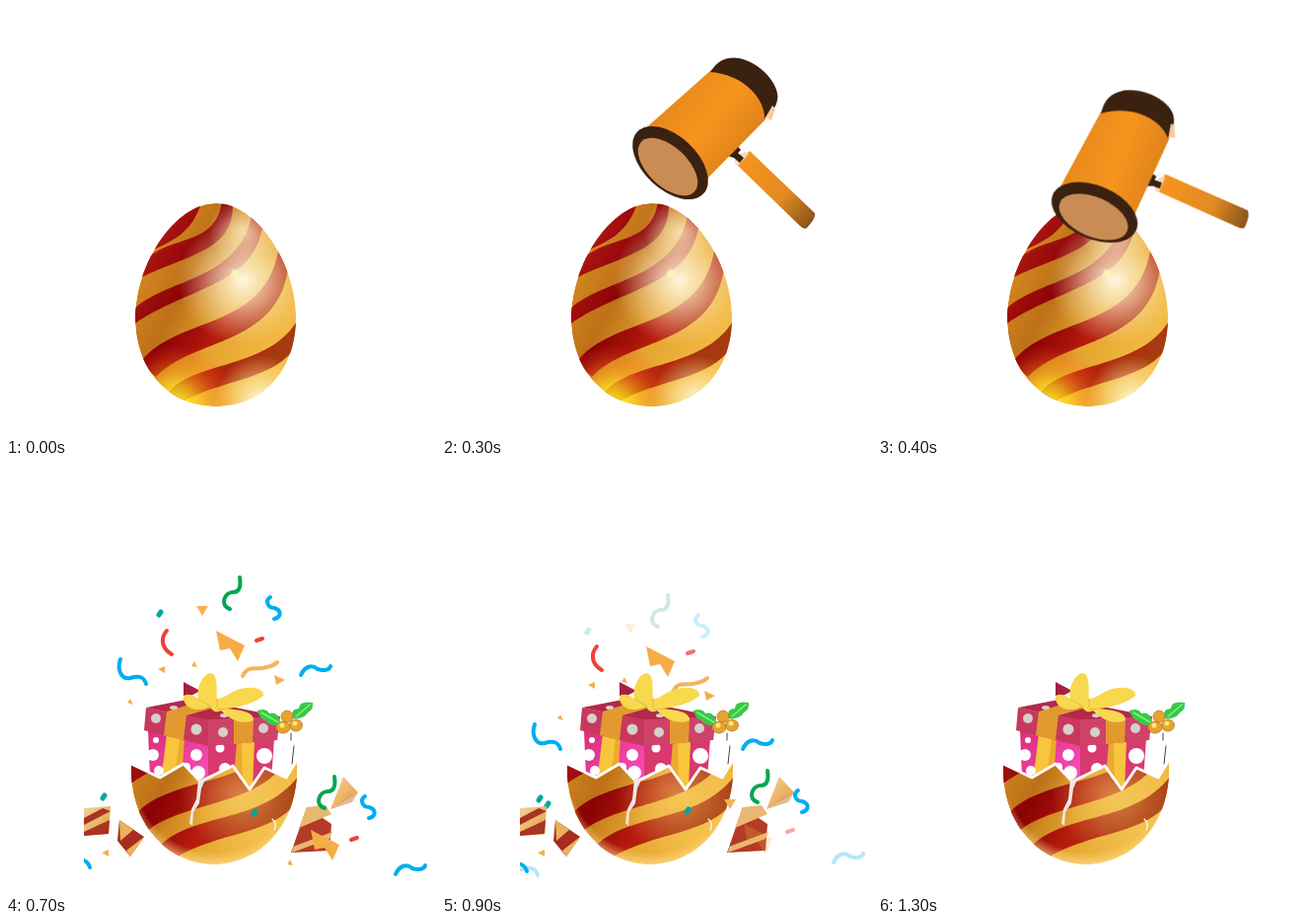
An HTML page for the animation above (3300 ms loop, 436x436 px).

```html
<!DOCTYPE html>
<html lang="en">
<head>
<meta charset="utf-8">
<title>Surprise egg</title>
<style>
  html, body { margin: 0; width: 100%; height: 100%; overflow: hidden; background: #fff; }
  svg { display: block; width: 100vw; height: 100vh; }
  .step { animation: 3300ms step-end infinite; }
  .whole { animation-name: whole; }
  .hammer { animation-name: hammer; transform-origin: 368px 218px; }
  .cracked { animation-name: cracked; }
  .open { animation-name: open; }
  .burst { animation-name: burst; }
  .fall { animation-name: fall; }
  .fade { animation-name: fade; }
  .shards { animation-name: shards; }
  @keyframes whole { 0% { visibility: visible } 15.15%, 100% { visibility: hidden } }
  @keyframes hammer {
    0% { visibility: hidden }
    6.06% { visibility: visible; transform: translate(20px, -8px) rotate(15deg) }
    9.09% { visibility: visible; transform: none }
    12.12% { visibility: visible; transform: rotate(-20deg) }
    15.15%, 100% { visibility: hidden }
  }
  @keyframes cracked { 0% { visibility: hidden } 15.15% { visibility: visible } 21.21%, 100% { visibility: hidden } }
  @keyframes open { 0% { visibility: hidden } 21.21%, 100% { visibility: visible } }
  @keyframes burst { 0% { visibility: hidden } 21.21% { visibility: visible } 27.27%, 100% { visibility: hidden } }
  @keyframes fall { 0% { visibility: hidden } 27.27% { visibility: visible } 33.33%, 100% { visibility: hidden } }
  @keyframes fade { 0% { visibility: hidden } 33.33% { visibility: visible } 39.39%, 100% { visibility: hidden } }
  @keyframes shards {
    0% { visibility: hidden }
    21.21% { visibility: visible; opacity: 1 }
    33.33% { visibility: visible; opacity: .5; transform: translateY(12px) }
    39.39%, 100% { visibility: hidden }
  }
  .line { fill: none; stroke-width: 4; stroke-linecap: round; stroke-linejoin: round; }
  .blue { stroke: #00aeef } .green { stroke: #00a651 } .teal { stroke: #00a79d; stroke-width: 5 }
  .red { stroke: #ef4136 } .amber { stroke: #f4b45c }
</style>
</head>
<body>
<svg viewBox="0 0 436 436">
  <defs>
    <linearGradient id="gold" gradientUnits="userSpaceOnUse" x1="135" y1="260" x2="290" y2="340">
      <stop offset="0" stop-color="#d58a20"/><stop offset=".3" stop-color="#bd7018"/>
      <stop offset=".6" stop-color="#e5a52e"/><stop offset="1" stop-color="#f4bd49"/>
    </linearGradient>
    <linearGradient id="stripe" gradientUnits="userSpaceOnUse" x1="140" y1="260" x2="290" y2="340">
      <stop offset="0" stop-color="#ab1512"/><stop offset=".3" stop-color="#8a0205"/>
      <stop offset=".6" stop-color="#b51b0c"/><stop offset="1" stop-color="#a63c10"/>
    </linearGradient>
    <radialGradient id="shine" gradientUnits="userSpaceOnUse" cx="240" cy="278" r="66">
      <stop offset="0" stop-color="#fffbe9" stop-opacity=".95"/>
      <stop offset=".35" stop-color="#fff3d0" stop-opacity=".65"/>
      <stop offset="1" stop-color="#ffe9b0" stop-opacity="0"/>
    </radialGradient>
    <radialGradient id="topShine" gradientUnits="userSpaceOnUse" cx="241" cy="228" r="36">
      <stop offset="0" stop-color="#fff0cc" stop-opacity=".75"/><stop offset="1" stop-color="#fff0cc" stop-opacity="0"/>
    </radialGradient>
    <radialGradient id="yellow" gradientUnits="userSpaceOnUse" cx="172" cy="405" r="62">
      <stop offset="0" stop-color="#ffff20"/><stop offset=".35" stop-color="#ffdf20" stop-opacity=".65"/>
      <stop offset="1" stop-color="#ff3010" stop-opacity="0"/>
    </radialGradient>
    <radialGradient id="rim" gradientUnits="userSpaceOnUse" cx="258" cy="400" r="46">
      <stop offset="0" stop-color="#fffbe0" stop-opacity=".95"/><stop offset="1" stop-color="#ffe680" stop-opacity="0"/>
    </radialGradient>
    <radialGradient id="softRim" gradientUnits="userSpaceOnUse" cx="212" cy="310" r="98">
      <stop offset=".85" stop-color="#ffd97a" stop-opacity="0"/><stop offset="1" stop-color="#ffe39a" stop-opacity=".75"/>
    </radialGradient>
    <radialGradient id="shellShine" gradientUnits="userSpaceOnUse" cx="238" cy="335" r="62">
      <stop offset="0" stop-color="#ffe27a" stop-opacity=".5"/><stop offset="1" stop-color="#ffe27a" stop-opacity="0"/>
    </radialGradient>
    <linearGradient id="wood" gradientUnits="userSpaceOnUse" x1="235" y1="95" x2="302" y2="148">
      <stop offset="0" stop-color="#e88a1c"/><stop offset=".5" stop-color="#f7941d"/><stop offset="1" stop-color="#df831b"/>
    </linearGradient>
    <linearGradient id="handle" gradientUnits="userSpaceOnUse" x1="305" y1="153" x2="374" y2="220">
      <stop offset="0" stop-color="#f7941d"/><stop offset=".6" stop-color="#e28a22"/><stop offset="1" stop-color="#8a541c"/>
    </linearGradient>
    <linearGradient id="pink" x2="1" y2="1">
      <stop offset="0" stop-color="#d92f78"/><stop offset="1" stop-color="#ff4fc4"/>
    </linearGradient>
    <linearGradient id="chip" x2="1" y2="1">
      <stop offset="0" stop-color="#f3d4a0"/><stop offset="1" stop-color="#e39a35"/>
    </linearGradient>
    <path id="eggShape" d="M213 200C255 200 294 262 294 316C294 372 258 406 213 406C168 406 131 372 131 316C131 262 171 200 213 200Z"/>
    <path id="shellShape" d="M127 304L156 318 180 304 197 322 230 306 247 330 262 308 284 318 295 300C299 368 255 406 211 406C166 406 124 366 127 304Z"/>
    <clipPath id="eggClip"><use href="#eggShape"/></clipPath>
    <clipPath id="shellClip"><use href="#shellShape"/></clipPath>
    <clipPath id="edge"><path d="M79 0H436V436H79Z"/></clipPath>

    <path id="stripes" fill="url(#stripe)" d="M145 249C170 238 188 230 198 200L170 200 140 240Z
      M135 265C160 229 212 248 219 198L230 202C230 251 180 252 130 279Z
      M128 309C160 276 235 280 249 213L260 225C249 285 180 286 128 324Z
      M136 362C170 314 262 330 276 248L286 266C275 345 190 336 152 376Z
      M163 394C190 358 268 370 297 316L294 345C272 380 215 379 178 402Z"/>
    <path id="wideStripes" fill="url(#stripe)" d="M143 252C170 238 196 232 207 200L180 198 140 240Z
      M132 282C160 238 212 254 222 200L236 205C222 262 172 256 132 288Z
      M127 306C165 275 238 278 263 222L275 238C250 295 172 290 127 324Z
      M127 360C165 310 262 335 285 260L294 282C270 350 184 338 142 373Z
      M154 389C188 352 262 366 298 314L296 342C268 377 218 372 172 399Z"/>

    <path id="green" class="line green" d="M227 147C216 143 222 130 230 130C238 130 238 122 237 115"/>
    <path id="curl" class="line blue" d="M268 135C262 139 266 146 272 146C279 148 280 155 272 157"/>
    <path id="blueLeft" class="line blue" d="M116 198C112 210 118 219 126 217C135 214 140 216 142 223"/>
    <path id="blueRight" class="line blue" d="M299 214C303 205 310 203 316 208C322 210 328 209 329 205"/>
    <path id="teal" class="line teal" d="M155 153L157 150"/>
    <path id="dash" class="line red" d="M254 179L260 177"/>
    <path id="flake" fill="#f6ad48" d="M213 169L242 184 235 200 227 187 217 189Z"/>
    <path id="topChip" fill="#f2b357" d="M193 144H205L199 154Z"/>
    <path id="leftChips" fill="#f2b04f" d="M123 242L129 244 126 238Z M154 208L161 205V212Z"/>
    <g id="middle">
      <path class="line red" d="M163 169C156 177 158 187 168 193"/>
      <path class="line amber" d="M240 215C246 202 256 210 264 206C270 205 273 203 275 201"/>
      <path fill="#f2b04f" d="M188 205L194 206 191 200Z M272 214L283 219 274 224Z"/>
      <use href="#flake"/><use href="#leftChips"/>
    </g>
    <g id="upper"><use href="#green"/><use href="#curl"/><use href="#teal"/><use href="#topChip"/></g>
    <g id="confetti">
      <use href="#upper"/><use href="#middle"/><use href="#dash"/><use href="#blueLeft"/><use href="#blueRight"/>
    </g>
  </defs>

  <g class="step whole">
    <g clip-path="url(#eggClip)">
      <use href="#eggShape" fill="url(#gold)"/>
      <use href="#stripes"/>
      <path fill="url(#topShine)" d="M190 190H300V270H190Z"/>
      <path fill="url(#shine)" d="M160 200H310V360H160Z"/>
      <path fill="url(#yellow)" d="M100 330H240V420H100Z"/>
      <path fill="url(#rim)" d="M200 340H310V420H200Z"/>
      <circle cx="232" cy="271" r="4" fill="#fff8b8" opacity=".7"/>
    </g>
  </g>

  <g class="step hammer">
    <path fill="url(#handle)" d="M298 160L312 147 378 210Q380 214 370 225Q367 227 363 223Z"/>
    <path fill="#f6d9b8" d="M297 160Q297 150 308 148L311 150 300 162Z"/>
    <path fill="#3a2110" d="M287 151L297 139 303 146 300 149 306 154 302 159 296 154Z"/>
    <path fill="url(#wood)" d="M203 127L274 64C304 66 329 90 328 115L268 176Z"/>
    <path fill="#3a2110" d="M272 67C280 54 290 51 302 53C326 59 343 82 340 95C339 103 333 109 327 114C328 94 305 69 272 67Z"/>
    <path fill="#f9c9a0" d="M328 113L335 101 338 104 334 116Z"/>
    <ellipse cx="231.500" cy="159" rx="46" ry="27" transform="rotate(43 231.500 159)" fill="#3a2110"/>
    <ellipse cx="229" cy="163" rx="37" ry="20" transform="rotate(43 229 163)" fill="#ca8c55"/>
  </g>

  <g class="step cracked">
    <g clip-path="url(#eggClip)">
      <use href="#eggShape" fill="url(#gold)"/>
      <use href="#wideStripes"/>
      <path fill="url(#shine)" d="M160 200H310V360H160Z"/>
      <use href="#eggShape" fill="none" stroke="#e9b458" stroke-width="3"/>
      <path fill="url(#softRim)" d="M120 340H300V410H120Z"/>
    </g>
    <path fill="#6b0d0b" d="M163 230L201 234 215 232 216 240 203 245 198 237Z"/>
    <path fill="#fff" stroke="#eee" stroke-width=".5" d="M208 203L214 207 210 222 205 233 207 250 199 266 208 280 222 301 210 314 203 325 198 344 193 369 190 350 197 326 207 311 209 300 201 283 192 270 199 249 200 235 207 220Z"/>
    <path class="line" stroke="#fff" style="stroke-width:3" d="M157 240L169 250 176 265 183 269 194 273M176 266L166 275 160 273M203 236L168 231"/>
    <use href="#confetti" x="-11" y="51"/>
  </g>

  <g clip-path="url(#edge)">
    <g class="step burst">
      <use href="#confetti"/>
      <g transform="translate(-57 186)"><use href="#teal"/><use href="#blueLeft"/><use href="#leftChips"/></g>
    </g>
    <g class="step fall">
      <use href="#upper" x="-8" y="18" opacity=".2"/>
      <use href="#middle" x="-6" y="16"/>
      <use href="#dash" x="-5" y="13" opacity=".75"/>
      <use href="#blueLeft" x="-22" y="66"/><use href="#blueRight" x="6" y="75"/>
      <use href="#teal" x="-57" y="188"/><use href="#teal" x="-49" y="194"/>
      <use href="#blueLeft" x="-56" y="190"/><use href="#blueLeft" x="-45" y="194" opacity=".3"/>
      <use href="#leftChips" x="-57" y="186"/>
    </g>
    <g class="step fade" opacity=".4">
      <use href="#blueLeft" x="-24" y="98"/><use href="#blueRight" x="8" y="105"/>
      <use href="#teal" x="-52" y="205"/><use href="#green" x="90" y="212"/><use href="#curl" x="92" y="212"/>
      <use href="#blueLeft" x="-50" y="202"/>
    </g>
    <g class="step shards">
      <path fill="url(#chip)" d="M79 349L106 347 104 375 79 377Z"/>
      <path fill="#a93422" d="M79 359L98 349 106 352 79 366Z M79 373L105 361 104 375 79 377Z"/>
      <path fill="#a72c1f" d="M115 361L140 378 126 398 113 382Z"/>
      <path fill="#e8b35a" d="M115 361L129 371 116 382Z M122 392L140 378 126 398Z"/>
      <path fill="#b43b26" d="M305 348L330 365 328 392 289 394Z"/>
      <path fill="#e8b873" d="M305 348L324 346 330 355 297 369Z M291 388L331 373 328 380 290 394Z"/>
      <path fill="url(#chip)" d="M342 317L357 333 329 350Z"/>
      <path fill="#c98343" d="M329 350L345 339 357 333 351 343Z" opacity=".55"/>
    </g>
  </g>

  <g class="step open">
    <path fill="#fff" d="M144 270L205 280 292 270 295 305 284 320 127 320Z"/>
    <path fill="url(#pink)" d="M144 270L205 284V332L146 318Z"/>
    <path fill="#d83a70" d="M205 284L272 278 268 335H205Z"/>
    <path fill="#edaa30" d="M163 275L181 279 178 320 158 316Z M234 281L252 279 248 332H230Z"/>
    <path fill="#f7c63c" d="M163 275L176 278 171 320 158 316Z M239 281L252 279 250 330H240Z"/>
    <g fill="#fff">
      <circle cx="149" cy="295" r="6"/><circle cx="193" cy="295" r="6"/><circle cx="155" cy="311" r="5"/>
      <circle cx="195" cy="313" r="7"/><circle cx="262" cy="296" r="8"/><circle cx="217" cy="288" r="4.500"/>
      <circle cx="222" cy="309" r="6"/><circle cx="183" cy="307" r="4"/><circle cx="152" cy="280" r="3"/>
    </g>
    <path fill="#b3284b" d="M142 247L188 238 278 256 205 260Z"/>
    <path fill="#c8385d" d="M142 247L205 259V286L140 270Z"/>
    <path fill="#cf4369" d="M205 259L278 256 275 280 205 286Z"/>
    <path fill="#e29a30" d="M163 251L183 254 180 280 160 275Z M231 258L251 257 250 282 231 284Z M163 251L195 241 211 247 183 255Z"/>
    <g fill="#d3d0cd">
      <circle cx="152" cy="258" r="5"/><circle cx="193" cy="269" r="5.500"/><circle cx="220" cy="272" r="5"/><circle cx="261" cy="268" r="5"/>
      <ellipse cx="170" cy="247" rx="4" ry="2"/><ellipse cx="221" cy="255" rx="4" ry="2"/>
    </g>
    <path fill="#a72042" d="M180 221L197 230 180 239Z"/>
    <path fill="#f8d84d" d="M207 246C192 253 179 247 180 235C185 232 191 235 195 238C193 226 200 212 208 212C216 215 213 229 214 238C224 238 229 227 246 227C255 226 262 230 261 235C251 243 239 246 224 248C239 250 251 251 251 260C239 265 227 259 218 250Q211 254 207 246Z"/>
    <path class="line" stroke="#e5b938" style="stroke-width:1" d="M195 238L208 246M214 238V246M225 248L214 249"/>
    <path fill="#35c94a" d="M255 250Q264 247 267 253Q277 250 278 264Q268 267 263 260Q257 258 255 250Z M291 258Q288 248 297 248Q297 240 311 242Q312 249 306 252Q302 259 291 258Z"/>
    <path class="line" stroke="#8df06f" style="stroke-width:1.500" d="M259 252L276 262M294 256L308 244"/>
    <g fill="#e2a52d" stroke="#bb791d" stroke-width=".8">
      <circle cx="285" cy="256" r="6"/><ellipse cx="281" cy="267" rx="7" ry="6"/><ellipse cx="294" cy="265" rx="6.500" ry="6"/>
    </g>
    <g fill="#ffe483"><circle cx="280" cy="265" r="2.500"/><circle cx="293" cy="263" r="2.500"/></g>
    <path class="line" stroke="#444" style="stroke-width:1" d="M289 273V280M292 286L290 304"/>
    <g clip-path="url(#shellClip)">
      <use href="#shellShape" fill="url(#gold)"/>
      <use href="#wideStripes"/>
      <path fill="url(#shellShine)" d="M170 270H300V400H170Z"/>
      <path fill="url(#softRim)" d="M120 340H300V410H120Z"/>
    </g>
    <path class="line" stroke="#fff" style="stroke-width:3" d="M127 304L156 318 180 304 197 322 230 306 247 330 262 308 284 318 295 300"/>
    <path fill="#eee6e3" d="M195 320L203 318 198 329 196 344 190 353 189 367 186 364 188 350 193 340Z"/>
    <path class="line" stroke="#fff" style="stroke-width:1.200" d="M270 360Q275 364 272 371"/>
  </g>

  <g class="step burst" transform="translate(96 202)">
    <use href="#green"/><use href="#curl"/><use href="#teal"/><use href="#dash"/><use href="#flake"/><use href="#blueRight"/>
    <path fill="#f2b04f" d="M189 204L195 205 192 199Z"/>
  </g>
  <g class="step fall" transform="translate(93 196)">
    <use href="#green"/><use href="#curl"/><use href="#teal" y="4"/><use href="#topChip"/>
    <use href="#dash" x="3" y="-2" opacity=".45"/><use href="#flake" opacity=".25"/><use href="#blueRight" x="5" y="-6" opacity=".3"/>
  </g>
</svg>
</body>
</html>
```
